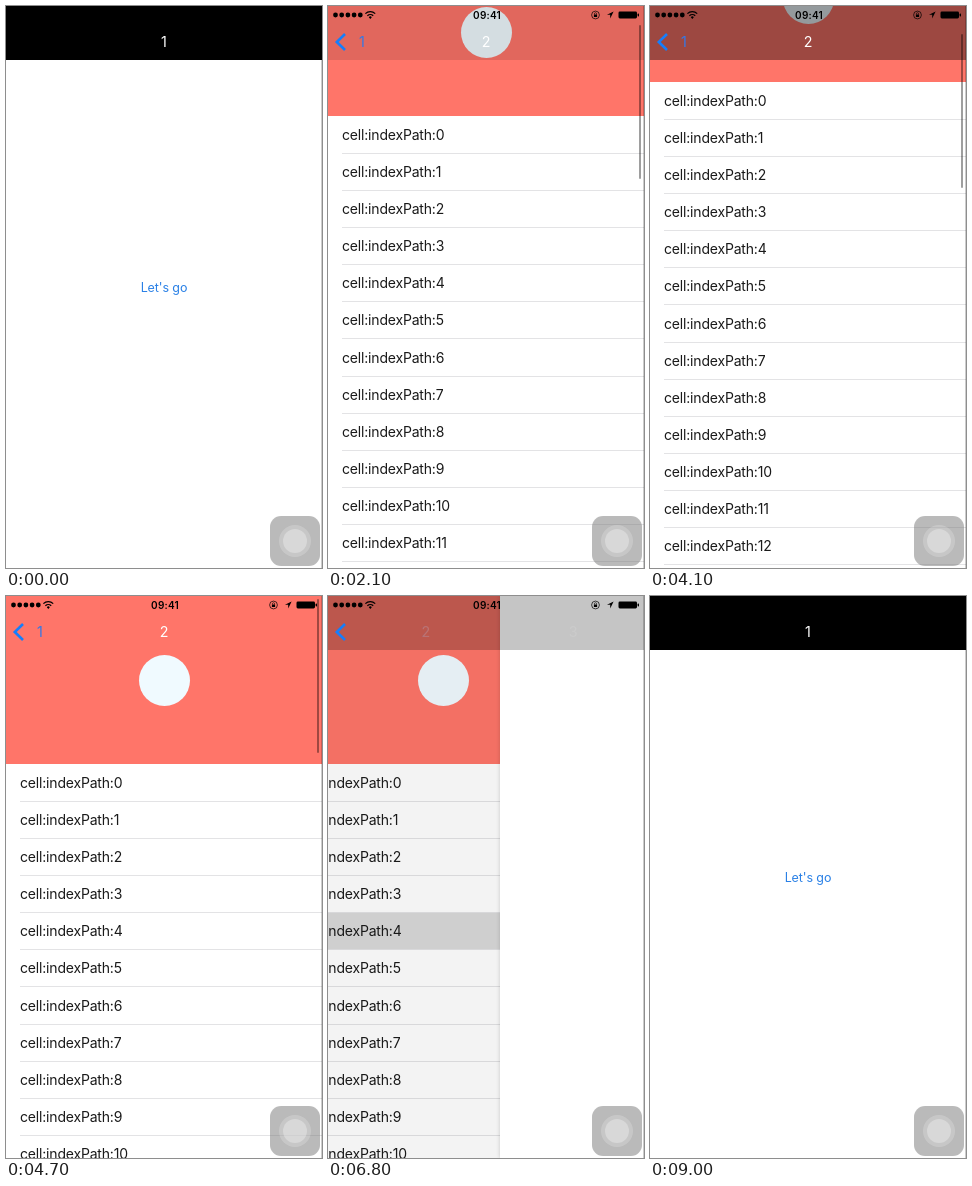
An HTML page that plays this animation: 316x562 px, repeating every 9900 ms.

```html
<!DOCTYPE html>
<html lang="en">
<head>
<meta charset="utf-8">
<title>Navigation bar transitions</title>
<style>
  html, body { margin: 0; width: 100%; height: 100%; overflow: hidden; background: #fff; }
  #stage {
    position: relative; width: 316px; height: 562px; overflow: hidden;
    background: #fff; color: #1a1a1a;
    font: 14px/1 Inter, Roboto, sans-serif;
  }
  #stage div, #stage svg { position: absolute; box-sizing: border-box; }
  .page {
    inset: 0; overflow: hidden; background: #fff;
    box-shadow: 0 0 4px rgba(0, 0, 0, .18);
  }
  .page::after {
    content: ""; position: absolute; inset: 0;
    background: #000; opacity: var(--dim, 0);
  }
  #go {
    top: 274px; width: 100%; text-align: center;
    font-size: 12.5px; line-height: 16px; letter-spacing: -.1px; color: #2a80e6;
  }
  #list { width: 100%; }
  #header { width: 100%; height: 168px; background: #ff7569; }
  #disc { left: 133px; top: 59px; width: 51px; height: 51px; border-radius: 50%; background: #f0faff; }
  .row { width: 100%; padding-left: 14px; letter-spacing: -.18px; white-space: nowrap; }
  .row::after {
    content: ""; position: absolute; left: 14px; right: 0; bottom: 0;
    height: 1px; background: #e3e3e5;
  }
  #thumb { left: 311px; width: 2px; height: 154px; border-radius: 1px; background: rgba(0, 0, 0, .38); }
  #bar { width: 100%; height: 54px; background: #000; }
  .title, .back { top: 26px; width: 40px; margin-left: -20px; text-align: center; line-height: 20px; font-size: 14.3px; }
  .title { color: #fff; }
  .back { color: #3578e6; }
  #status text { font: 600 10px Inter, Roboto, sans-serif; letter-spacing: .2px; }
  #touch { left: 264px; top: 510px; width: 50px; height: 50px; border-radius: 11px; background: rgba(119, 119, 119, .5); }
  #touch div { border-radius: 50%; background: rgba(255, 255, 255, .2); }
  #touch .outer { inset: 9px; }
  #touch .inner { inset: 13px; background: rgba(255, 255, 255, .3); }
  #edge { right: 0; width: 1px; height: 100%; background: rgba(0, 0, 0, .2); }
</style>
</head>
<body>
<div id="stage">
  <div class="page"><div id="go">Let's go</div></div>
  <div class="page">
    <div id="list"><div id="header"><div id="disc"></div></div></div>
    <div id="thumb"></div>
  </div>
  <div class="page"></div>

  <div id="bar"></div>
  <div class="title">1</div>
  <div class="title">2</div>
  <div class="title">3</div>
  <div class="back">1</div>
  <div class="back">2</div>
  <svg id="chevron" width="24" height="54" fill="none" stroke="#157efb" stroke-width="2.6">
    <path d="M17 28 8.8 36 17 44"/>
  </svg>

  <svg id="status" width="316" height="18">
    <path d="M7.5 9H33" stroke="#000" stroke-width="4.8" stroke-linecap="round" stroke-dasharray="0 6.2"/>
    <g fill="none" stroke="#000" stroke-width="1.3">
      <path d="M37.4 7.6a7 7 0 0 1 9.8 0M39.4 9.8a4.2 4.2 0 0 1 5.8 0"/>
      <circle cx="267.5" cy="9" r="3.9" stroke-width=".7"/>
      <path d="M266.4 8.6V7.8a1.1 1.1 0 0 1 2.2 0v.8" stroke-width=".6"/>
    </g>
    <path d="M40.8 11.2a2 2 0 0 1 3 0l-1.5 1.7ZM265.9 8.5h3.2v2.4h-3.2ZM285.6 5.4 279 8.8h3.2v3.8Z"/>
    <text x="159" y="12.6" text-anchor="middle">09:41</text>
    <rect x="290.5" y="5.5" width="18.5" height="7" rx="1.4"/>
    <rect x="309.6" y="7.6" width="1.4" height="2.8" rx=".6"/>
  </svg>

  <div id="touch"><div class="outer"></div><div class="inner"></div></div>
  <div id="edge"></div>
</div>

<script>
  const LOOP = 9900, STEP = 100, W = 316, REACH = 241;
  const PUSH_LIST = 760, PUSH_TOP = 5255;
  const $ = id => document.getElementById(id);
  const all = selector => [...document.querySelectorAll(selector)];
  const clamp = v => Math.min(1, Math.max(0, v));
  const mix = (a, b, u) => a + (b - a) * u;
  const ramp = (t, start, length) => clamp((t - start) / length);
  const pulse = (t, on, off) => Math.min(ramp(t, on, 100), ramp(-t, -off, 200));

  // Critically damped spring from 0 to 1.
  function spring(ms) {
    if (ms <= 0) return 0;
    if (ms > 600) return 1;
    const x = ms * .01826;
    return 1 - (1 + x) * Math.exp(-x);
  }

  // Edge swipe: smoothstep with a slower start.
  function swipe(t, start, length, lag) {
    const u = ramp(t, start, length) ** lag;
    return u * u * (3 - 2 * u);
  }

  function scrollAt(t) {
    const up = ramp(t, 1800, 1300), down = ramp(t, 3900, 1000);
    return REACH * (1 - (1 - up * up) ** 5) * (1 - down) ** 4.34;
  }

  const rowTop = i => Math.ceil(168.5 + 37.08 * i);
  const rows = Array.from({ length: 50 }, (_, i) => {
    const row = document.createElement("div"), height = rowTop(i + 1) - rowTop(i);
    row.className = "row";
    row.textContent = "cell:indexPath:" + i;
    row.style.cssText = `top:${rowTop(i)}px;height:${height}px;line-height:${height - 1}px`;
    $("list").append(row);
    return row;
  });
  const pages = all(".page"), titles = all(".title"), backs = all(".back");

  function place(el, x, opacity) {
    el.style.left = x + "px";
    el.style.opacity = opacity;
  }

  function draw(t) {
    const scroll = Math.round(scrollAt(t));
    const popped = swipe(t, 6200, 1000, 1.245) + swipe(t, 7800, 800, 1.095);
    // Depth is the place in the stack: 0, 1 or 2 at rest, fractions in transit.
    const depth = spring(t - PUSH_LIST) + spring(t - PUSH_TOP) - popped;
    const barDepth = ramp(t, PUSH_LIST, 100) + ramp(t, PUSH_TOP, 100) - popped;

    pages.forEach((page, k) => {
      const ahead = k - depth;
      const x = Math.round(ahead > 0 ? ahead * W : Math.max(-1, ahead) * .3 * W);
      page.style.left = x + "px";
      page.style.right = -x + "px";
      page.style.visibility = Math.abs(ahead) < .9999 ? "visible" : "hidden";
      page.style.setProperty("--dim", .1 * clamp(-ahead));
    });
    titles.forEach((el, k) => {
      const ahead = k - depth;
      place(el, 158 + ahead * (ahead > 0 ? 160 : 132), clamp(1 - Math.abs(ahead)) ** 3);
    });
    backs.forEach((el, k) => {
      const ahead = k + 1 - depth;
      place(el, 34 + ahead * 116, clamp(1 - Math.abs(ahead)) ** 3);
    });
    $("chevron").style.opacity = clamp(depth) ** 4;

    const listAlpha = clamp((scroll - 43) / 128);
    $("bar").style.opacity = barDepth < 1
      ? mix(1, listAlpha, barDepth)
      : mix(listAlpha, .5, barDepth - 1);

    $("list").style.top = -scroll + "px";
    $("thumb").style.top = 3 + scroll * .274 + "px";
    $("thumb").style.opacity =
      pulse(t, 1200, 1700) + pulse(t, 1800, 3700) + pulse(t, 3900, 5100) + pulse(t, 7100, 7400);
    rows[4].style.background = `rgba(217,217,217,${pulse(t, 5200, 7400)})`;
    $("go").style.opacity = t >= 700 && t < 800 ? .3 : 1;
  }

  const start = performance.now();
  function tick() {
    const t = (performance.now() - start) % LOOP;
    draw(Math.floor((t + 2) / STEP) * STEP % LOOP);
    requestAnimationFrame(tick);
  }
  tick();
</script>
</body>
</html>
```
